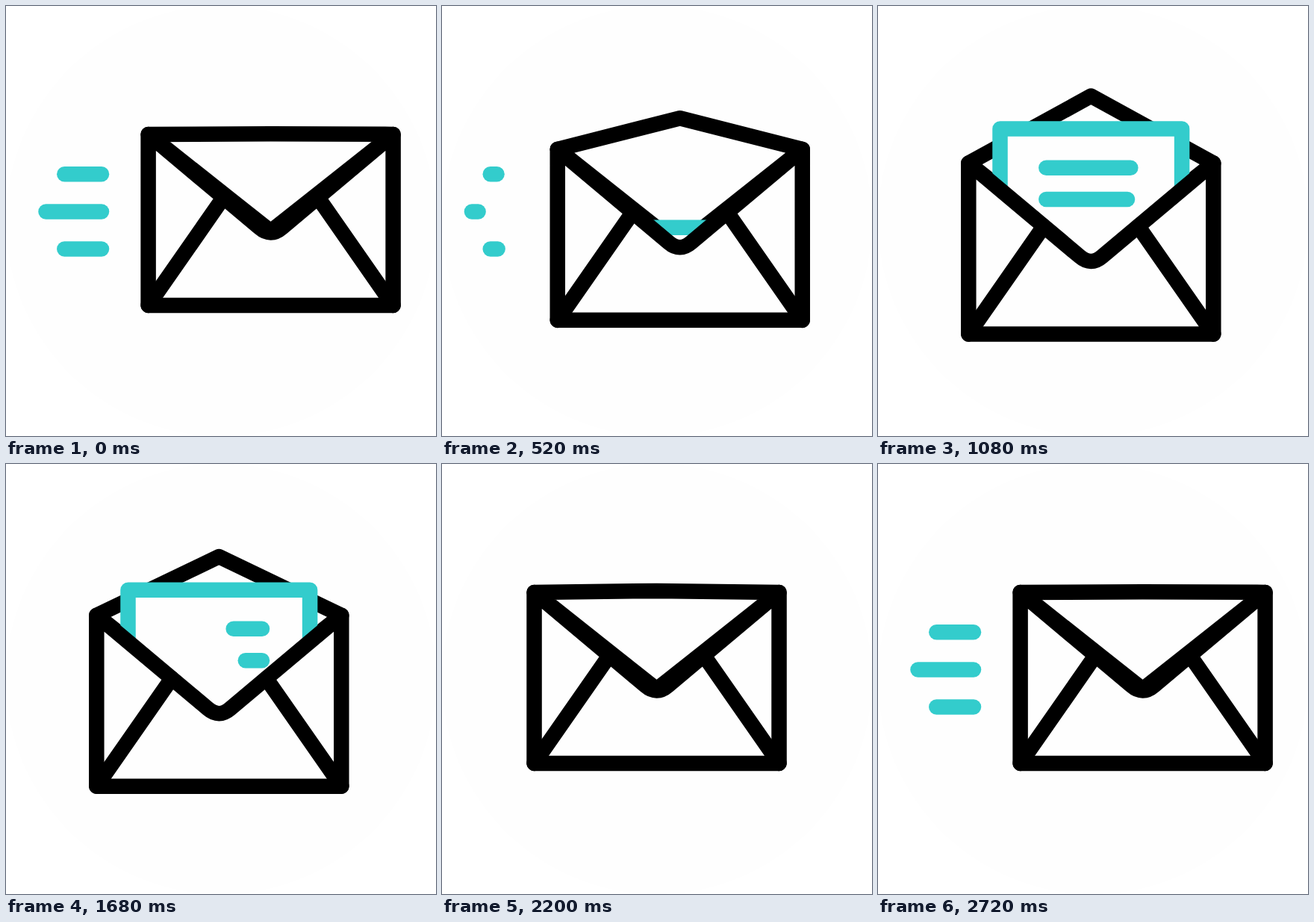
Recreate the animation shown at these times as an HTML page. Size 576 by 576 pixels, loop 3000 ms.

```html
<!DOCTYPE html>
<html lang="en">
<head>
<meta charset="utf-8">
<title>Envelope</title>
<style>
  html, body { margin: 0; width: 100%; height: 100%; overflow: hidden; background: #fff; }
  svg { display: block; width: 100vw; height: 100vh; }
  path { stroke-width: 20.5; stroke-linecap: round; stroke-linejoin: round; }
  .ink { stroke: #000; fill: #fefefe; }
  .teal { stroke: #33cccc; fill: none; }
  #sheet { fill: #fefefe; }
</style>
</head>
<body>
<svg viewBox="0 0 576 576">
  <circle cx="288" cy="288" r="288" fill="#fefefe"/>
  <path class="teal wind"/>
  <path class="teal wind"/>
  <path class="teal wind"/>
  <g id="mail">
    <path id="flap" class="ink"/>
    <path id="sheet" class="teal"/>
    <path class="teal row"/>
    <path class="teal row"/>
    <path class="ink" d="M-164 0L-15 125Q0 138 15 125L164 0V229H-164Z"/>
    <path class="ink" d="M-164 229L-63.3 84.6M164 229L63.3 84.6"/>
  </g>
</svg>
<script>
const LOOP = 3000, STEP = 40;
const $ = id => document.getElementById(id);
const winds = document.querySelectorAll('.wind');
const rows = document.querySelectorAll('.row');

// Cubic bezier (.6, 0, .22, 1), solved by bisection
function ease(u) {
  if (u <= 0) return 0;
  if (u >= 1) return 1;
  let lo = 0, hi = 1, s;
  for (let i = 0; i < 24; i++) {
    s = (lo + hi) / 2;
    const r = 1 - s;
    if (1.8 * s * r * r + 0.66 * s * s * r + s * s * s < u) lo = s; else hi = s;
  }
  return s * s * (3 - 2 * s);
}

const ramp = (t, start, length) => ease((t - start) / length);
// Rises to 1 in the first span and falls back to 0 in the second
const pulse = (t, a, la, b, lb) => ramp(t, a, la) - ramp(t, b, lb);

function line(el, x1, x2, y) {
  const shown = x2 - x1 > 0.3;
  el.setAttribute('d', shown ? `M${x1} ${y}H${x2}` : '');
}

// y, left end, start of leaving, start of entering
const WIND = [
  [225.3, 78.3, 270, 2215],
  [275.4, 53.5, 245, 2200],
  [325.4, 78.3, 277, 2225]
];
// offset below the sheet's top, start of writing, start of erasing
const ROWS = [
  [52.2, 678, 1438],
  [94.6, 716, 1400]
];

function draw(t) {
  const x = 354.6 - 69.3 * pulse(t, 150, 845, 2099, 622);
  const y = 171.9 + 38.6 * pulse(t, 150, 845, 1460, 673);
  $('mail').setAttribute('transform', `translate(${x} ${y})`);

  const tip = -0.6 - 89.4 * pulse(t, 100, 1000, 1424, 915);
  $('flap').setAttribute('d', `M-164 0L0 ${tip}L164 0L0 130Z`);

  const top = 180 - 226 * pulse(t, 200, 842, 1512, 840);
  const foot = Math.min(top + 180, 225);
  $('sheet').setAttribute('d', `M-121.8 ${foot}V${top}H121.8V${foot}`);

  ROWS.forEach(([dy, write, erase], i) => {
    const from = ramp(t, erase, 489), to = ramp(t, write, 525);
    line(rows[i], -60 + 117.7 * from, -60 + 117.7 * to, top + dy);
  });

  const drift = t < 1400 ? -30 * ramp(t, 291, 548) : 0;
  WIND.forEach(([wy, left, leave, enter], i) => {
    const span = 128 - left;
    if (t < 1400) line(winds[i], left + drift, left + drift + span * (1 - ramp(t, leave, 430)), wy);
    else line(winds[i], 128 - span * ramp(t, enter, 390), 128, wy);
  });
}

function tick() {
  const t = performance.now() % LOOP;
  draw(Math.floor(t / STEP) * STEP);
  requestAnimationFrame(tick);
}
tick();
</script>
</body>
</html>
```
